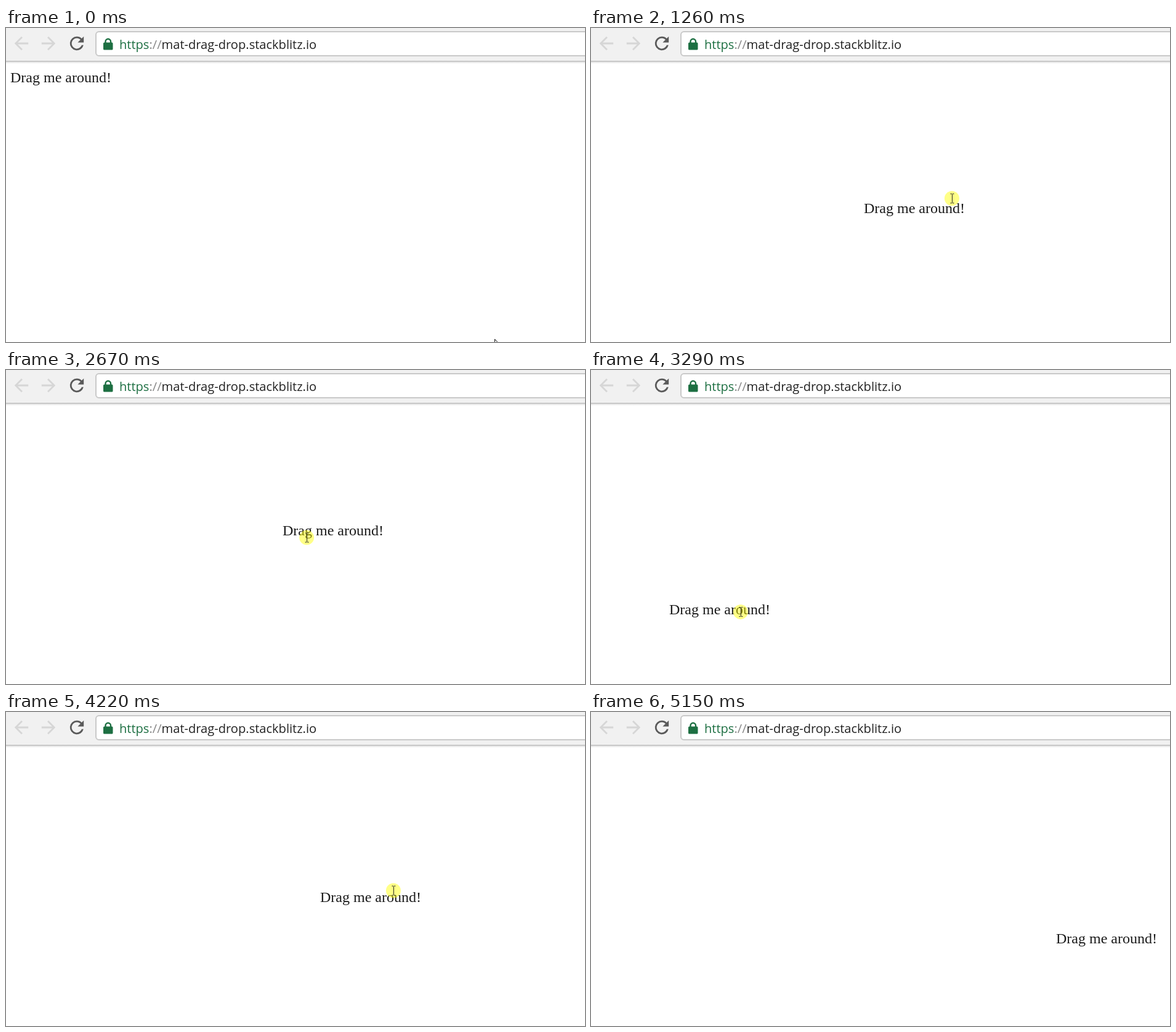
An HTML page for the animation above (5620 ms loop, 940 px wide and 509 px high).

```html
<!DOCTYPE html>
<html lang="en">
<head>
<meta charset="utf-8">
<title>Drag me around!</title>
<style>
  html, body { margin: 0; width: 100%; height: 100%; overflow: hidden; background: #fff; }
  svg { display: block; }
  .url { font: 20.1px "Open Sans", "Noto Sans", sans-serif; fill: #222; }
  #label { font: 24px "Liberation Serif", "Times New Roman", serif; fill: #1c1c1c; }
</style>
</head>
<body>
<svg width="940" height="509" viewBox="0 0 940 509">
  <defs>
    <linearGradient id="shadow" x2="0" y2="1">
      <stop stop-color="#e4e4e4"/>
      <stop offset="1" stop-color="#fff"/>
    </linearGradient>
    <path id="back" d="M20 11H7.8l5.6-5.6L12 4l-8 8 8 8 1.4-1.4L7.8 13H20z" fill="#d6d6d6"/>
  </defs>

  <rect width="940" height="53" fill="#f1f1f1"/>
  <rect y="53" width="940" height="2" fill="#c9c9c9"/>
  <rect y="55" width="940" height="3" fill="url(#shadow)"/>
  <use href="#back" transform="translate(8.2 8.2) scale(1.4)"/>
  <use href="#back" transform="translate(85.8 8.2) scale(-1.4 1.4)"/>
  <path transform="translate(98.2 8.2) scale(1.4)" fill="#5a5a5a"
    d="M17.65 6.35A8 8 0 0 0 12 4a8 8 0 1 0 7.73 10h-2.08A6 6 0 1 1 12 6c1.66 0 3.14.69 4.22 1.78L13 11h7V4z"/>
  <rect x="146" y="6" width="820" height="39" rx="5" fill="#fff" stroke="#c9c9c9" stroke-width="2"/>
  <g fill="#1d6f42">
    <rect x="158" y="23.5" width="15.5" height="12" rx="1.5"/>
    <path d="M161.5 24V22a4.25 4.25 0 0 1 8.5 0V24" fill="none" stroke="#1d6f42" stroke-width="2.4"/>
  </g>
  <text class="url" x="184" y="34"><tspan fill="#1d6f42">https</tspan><tspan fill="#888">://</tspan>mat-drag-drop.stackblitz.io</text>

  <text id="label" y="8">Drag me around!</text>
  <g id="cursor">
    <circle id="press" r="12" fill="#ff0" opacity=".47"/>
    <path id="arrow" d="M.5.5V16.5L4.3 13 6.8 19 9.2 18 6.7 12.2H11.8Z" fill="#fff" stroke="#111"/>
    <path id="beam" d="M-2.5-7.5H0M1-7.5H3.5M.5-7V7M-2.5 7.5H0M1 7.5H3.5" fill="none" stroke="#222"/>
  </g>
</svg>
<script>
const LOOP = 5620, STEP = 77.8, LEAD = 0.4, LABEL_WIDTH = 163;

// Key points are [step, x, y]. A move with a grab offset drags the label,
// the pointer running slightly ahead of it; the others move the pointer alone.
const moves = [
  { path: [[1, 793, 504], [7, 108, 79]] },
  { grab: [95, -11], path: [[9, 7, 80], [11, 90, 153], [13, 443, 206], [16, 310, 300],
    [17, 443, 292], [19, 642, 268], [22, 531, 247], [24, 658, 199]] },
  { path: [[24, 744, 205], [25, 741, 269], [27, 746, 290], [31, 744, 211]] },
  { grab: [78, 3], path: [[32, 658, 199], [35, 449, 260], [37, 241, 306], [40, 127, 388]] },
  { path: [[40, 264, 391], [41, 264, 409]] },
  { grab: [110, 6], path: [[43, 127, 388], [46, 290, 330], [48, 350, 285], [50, 374, 254],
    [51, 285, 225], [53, 252, 360], [55, 510, 300], [58, 430, 172], [59, 329, 205],
    [60, 400, 250], [63, 755, 367]] },
  { path: [[63, 865, 373], [66, 879, 498], [67, 888, 540]] },
];
const drags = moves.filter(m => m.grab);

const [label, cursor, press, arrow, beam] =
  ["label", "cursor", "press", "arrow", "beam"].map(id => document.getElementById(id));

const currentMove = (list, step) => list.findLast(m => m.path[0][0] <= step) || list[0];

// Smooth curve through the key points, at rest at both ends.
function pointAt(path, step) {
  const last = path.length - 1;
  const s = Math.min(Math.max(step, path[0][0]), path[last][0]);
  const i = Math.min(path.findLastIndex(p => p[0] <= s), last - 1);
  const a = path[i], b = path[i + 1], span = b[0] - a[0], f = (s - a[0]) / span;
  const slope = (n, axis) => n === 0 || n === last ? 0
    : (path[n + 1][axis] - path[n - 1][axis]) / (path[n + 1][0] - path[n - 1][0]);
  return [1, 2].map(axis =>
    a[axis] + (b[axis] - a[axis]) * f * f * (3 - 2 * f) +
    span * f * (1 - f) * (slope(i, axis) * (1 - f) - slope(i + 1, axis) * f));
}

const place = (el, x, y) => el.setAttribute("transform", `translate(${x} ${y})`);
const show = (el, on) => el.setAttribute("visibility", on ? "visible" : "hidden");

function render(now) {
  const step = Math.floor((now % LOOP + 70) / STEP);
  const { grab, path } = currentMove(moves, step);
  const [x, y] = pointAt(currentMove(drags, step).path, step);
  const [cx, cy] = grab
    ? pointAt(path, step + LEAD).map((v, i) => v + grab[i])
    : pointAt(path, step);
  const overLabel = cx > x && cx < x + LABEL_WIDTH && Math.abs(cy - y) < 17;

  place(label, x, y);
  place(cursor, cx, cy);
  show(press, grab);
  show(beam, overLabel);
  show(arrow, !overLabel);
}

const start = performance.now();
function tick() {
  render(performance.now() - start);
  requestAnimationFrame(tick);
}
tick();
</script>
</body>
</html>
```
